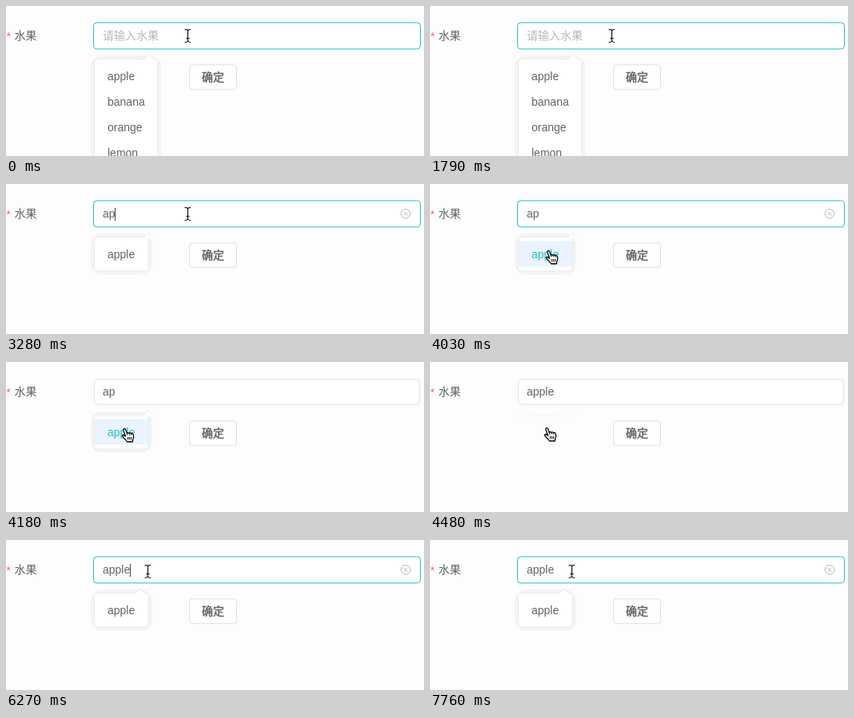
These frames come from a looping animation (523x188 px, 8000 ms). An HTML page with a canvas:

```html
<!DOCTYPE html>
<html lang="zh">
<head>
<meta charset="utf-8">
<title>水果</title>
<style>
html, body { margin: 0; width: 100%; height: 100%; overflow: hidden; background: #fdfdfd; }
canvas { display: block; width: 523px; height: 188px; }
</style>
</head>
<body>
<canvas id="stage"></canvas>
<script>
const W = 523, H = 188, LOOP = 8000;
const TEAL = '#20c0c2', INK = '#606266', LINE = '#dcdfe6', PALE = '#b4b6ba';
const LATIN = '"Liberation Sans", "Noto Sans CJK SC", sans-serif';
const CJK = '"Noto Sans CJK SC", "Noto Sans CJK", sans-serif';
const FRUITS = ['apple', 'banana', 'orange', 'lemon'];

const canvas = document.getElementById('stage');
const ctx = canvas.getContext('2d');
const ratio = window.devicePixelRatio || 1;
canvas.width = W * ratio;
canvas.height = H * ratio;

const HAND = new Path2D('M4.6 10.2L2 3Q1.4 1 2.9 .7Q4.3 .5 4.9 2.2L6.3 6.3Q7.6 5 8.9 6.3Q10.3 5.2 11.6 6.7Q13.7 6 14.3 8.2Q15.3 11 13.8 13.8L13.2 17H6.6Q5 14.4 2.6 12.4Q.2 10.3 .7 9Q1.6 7.6 4.6 10.2Z');
const KNUCKLES = new Path2D('M6.3 6.3L6.9 8.6M8.9 6.3L9.4 8.6M11.6 6.7L11.9 8.8M7.6 11v3.4M9.6 11v3.4M11.6 11v3.4');
const ARROW = new Path2D('M0 0V14L3.3 11L5.5 16L7.8 15L5.6 10.2H10Z');
const BEAM = new Path2D('M-3.5 -7.5Q-.5 -7.5 .5 -6.5Q1.5 -7.5 4 -7.5M.5 -6.5V7M-3.5 8.5Q-.5 8.5 .5 7Q1.5 8.5 4 8.5M-1.5 3.5H2.5');

// Each entry changes only the listed properties from its time onwards.
const timeline = [
  [0, { text: '', caret: false, focus: true, hover: true, cursor: ['beam', 227, 37],
        items: FRUITS, tip: 179, scale: 1, alpha: 1, hot: false }],
  [290, { caret: true }],
  [890, { caret: false }],
  [1340, { caret: true }],
  [1790, { caret: false }],
  [2390, { caret: true }],
  [2840, { text: 'a' }],
  [2980, { items: FRUITS.slice(0, 3) }],
  [3280, { text: 'ap', items: FRUITS.slice(0, 1) }],
  [3880, { caret: false, hover: false, cursor: ['arrow', 192, 62] }],
  [4030, { cursor: ['hand', 145, 83], hot: true }],
  [4180, { focus: false }],
  [4330, { text: 'apple', scale: 0.5, alpha: 0.5, hot: false, cursor: ['hand', 143, 82] }],
  [4480, { scale: 0.05, alpha: 0.12 }],
  [4620, { scale: 0, cursor: ['arrow', 154, 75] }],
  [4770, { hover: true, cursor: ['beam', 172, 45] }],
  [4920, { cursor: ['beam', 177, 39] }],
  [5070, { focus: true, caret: true }],
  [5370, { tip: 168, scale: 0.6, alpha: 0.6 }],
  [5520, { scale: 1, alpha: 1 }],
  [5670, { caret: false }],
  [6270, { caret: true }],
  [6720, { caret: false }],
  [7160, { caret: true }],
  [7760, { caret: false }]
];

function stateAt(time) {
  const changes = timeline.filter(([start]) => start <= time).map(([, change]) => change);
  return Object.assign({}, ...changes);
}

function box(x, y, w, h, r, fill, stroke, weight = 1) {
  ctx.beginPath();
  ctx.roundRect(x, y, w, h, r);
  if (fill) { ctx.fillStyle = fill; ctx.fill(); }
  if (stroke) { ctx.strokeStyle = stroke; ctx.lineWidth = weight; ctx.stroke(); }
}

function label(text, x, baseline, color = INK, family = LATIN) {
  ctx.font = `14px ${family}`;
  ctx.fillStyle = color;
  ctx.fillText(text, x, baseline);
}

function drawButton() {
  box(229.5, 73.8, 59, 31, 4, '#fff', LINE);
  label('确定', 245, 94, INK, CJK);
  // A hairline stroke gives the medium weight.
  ctx.strokeStyle = INK;
  ctx.lineWidth = 0.5;
  ctx.strokeText('确定', 245, 94);
}

function drawClearIcon() {
  ctx.strokeStyle = PALE;
  ctx.lineWidth = 1;
  ctx.beginPath();
  ctx.arc(500, 37.3, 5.8, 0, Math.PI * 2);
  ctx.moveTo(498, 35.3); ctx.lineTo(502, 39.3);
  ctx.moveTo(502, 35.3); ctx.lineTo(498, 39.3);
  ctx.stroke();
}

function drawInput(s) {
  if (s.focus) box(109.5, 20.9, 409, 33, 4, '#fff', TEAL, 1);
  else box(110.3, 21.8, 407.4, 31.2, 4, '#fff', s.hover ? '#c0c4cc' : LINE);

  if (s.text) label(s.text, 121, 42);
  else label('请输入水果', 121, 42, '#b3b6bc', CJK);

  if (s.caret) {
    ctx.font = `14px ${LATIN}`;
    ctx.fillStyle = '#444';
    ctx.fillRect(Math.floor(121 + ctx.measureText(s.text).width), 30, 1, 16);
  }
  if (s.text && (s.focus || s.hover)) drawClearIcon();
}

function drawPopup(s) {
  if (!s.scale) return;
  const w = s.items.length > 1 ? 80 : 69;
  const h = s.items.length * 32 + 12;
  ctx.save();
  ctx.globalAlpha = s.alpha;
  ctx.translate(0, 66);
  ctx.scale(1, s.scale);
  ctx.translate(0, -66);

  box(106, 62, w + 8, h + 8, 15, '#f4f4f4');
  box(110.5, 66.5, w - 1, h - 1.5, 3, '#fff', '#e8eaee');

  ctx.beginPath();
  ctx.moveTo(s.tip - 6.5, 67.2);
  ctx.lineTo(s.tip, 61);
  ctx.lineTo(s.tip + 6.5, 67.2);
  ctx.fillStyle = '#fff';
  ctx.fill();
  ctx.strokeStyle = '#ebedf0';
  ctx.lineWidth = 1;
  ctx.stroke();

  if (s.hot) {
    ctx.fillStyle = '#eaf3ff';
    ctx.fillRect(111, 71.5, w - 2, 32);
  }
  s.items.forEach((item, i) => label(item, 127, 93 + i * 32, s.hot ? TEAL : INK));
  ctx.restore();
}

function outline(path, weight, color) {
  ctx.lineWidth = weight;
  ctx.strokeStyle = color;
  ctx.stroke(path);
}

function drawCursor([kind, x, y]) {
  ctx.save();
  ctx.translate(x, y);
  ctx.lineJoin = 'round';
  if (kind === 'beam') {
    outline(BEAM, 2.6, '#fff');
    outline(BEAM, 1.1, '#000');
  } else if (kind === 'hand') {
    ctx.fillStyle = '#fff';
    ctx.fill(HAND);
    outline(HAND, 1.3, '#000');
    outline(KNUCKLES, 1, '#000');
  } else {
    outline(ARROW, 2, '#fff');
    ctx.fillStyle = '#000';
    ctx.fill(ARROW);
  }
  ctx.restore();
}

function draw() {
  const s = stateAt(performance.now() % LOOP);
  ctx.setTransform(ratio, 0, 0, ratio, 0, 0);
  ctx.fillStyle = '#fdfdfd';
  ctx.fillRect(0, 0, W, H);

  label('*', 0.5, 43, '#f56c6c');
  label('水果', 10.5, 42, INK, CJK);
  drawButton();
  drawInput(s);
  drawPopup(s);
  drawCursor(s.cursor);
  requestAnimationFrame(draw);
}
draw();
</script>
</body>
</html>
```
